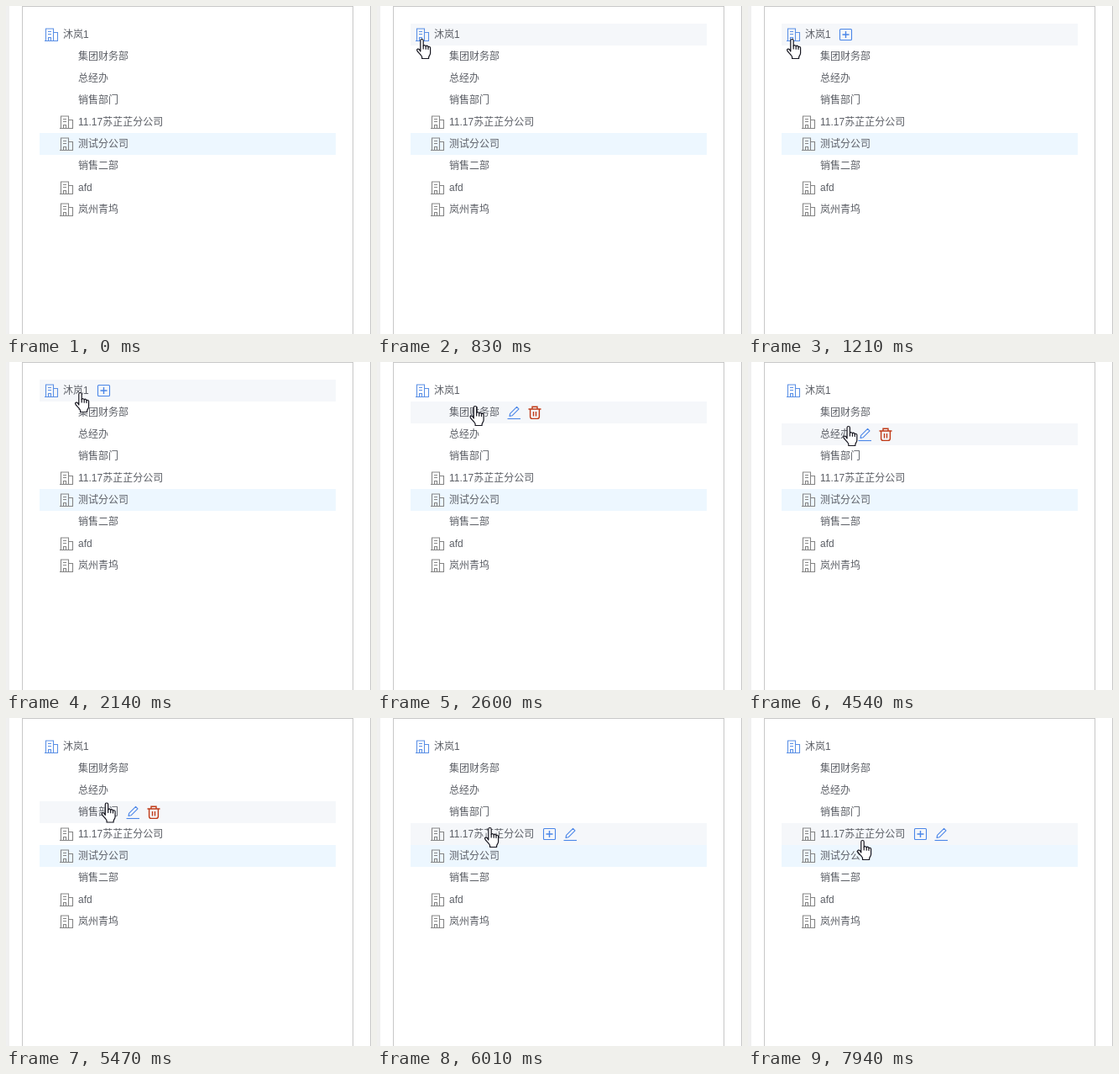
Write an HTML page that moves like this. It is 435 px wide and 390 px high and loops after 8000 ms.

```html
<!DOCTYPE html>
<html lang="zh">
<head>
<meta charset="utf-8">
<title>组织架构</title>
<style>
  html, body { margin: 0; width: 100%; height: 100%; overflow: hidden; background: #fff; }
  svg { display: block; }
  text { font: 12px "Liberation Sans", "Noto Sans CJK SC", "Noto Sans CJK", sans-serif; fill: #5c5f66; }
  .icon { fill: none; stroke-width: 1.1; }
</style>
</head>
<body>
<svg width="435" height="390" viewBox="0 0 435 390">
  <defs>
    <g id="building" class="icon" stroke-width="1">
      <path d="M1.5 15.5V1H10.5V15.5M0 15.5H16M10.5 5.5H15.5V15.5"/>
      <path d="M4 4.5H8M4 7.5H8M4.5 15V11.5H7.5V15"/>
    </g>
    <g id="plus" class="icon" stroke="#4a86e8">
      <rect x="1.5" y="1.5" width="14" height="13" rx="1"/>
      <path d="M4.5 8H12.5M8.5 4V12" stroke-width="1.4"/>
    </g>
    <g id="pencil" class="icon" stroke="#4a86e8">
      <path d="M.5 15.5H16"/>
      <path d="M3 12.4L3.6 9.4L11.6 1.4L14 3.8L6 11.8Z" stroke-linejoin="round"/>
    </g>
    <g id="trash" class="icon" stroke="#c03a17">
      <path d="M.5 4H15.5M5 4V1.2H11V4M2.6 4V13Q2.6 15.4 5 15.4H11Q13.4 15.4 13.4 13V4M6.5 7V12.5M9.5 7V12.5" stroke-width="1.4"/>
    </g>
  </defs>
  <g shape-rendering="crispEdges">
    <rect width="4" height="390" fill="#f0f0f0"/>
    <path d="M19.5 390V.5H413.5V390M434.5 0V390" fill="none" stroke="#c8c8c8"/>
  </g>
  <g id="tree"></g>
  <g id="hand" stroke="#15151f" stroke-width="1.2" stroke-linejoin="round" stroke-linecap="round">
    <path fill="#fff" d="M4.8 15V2.2a1.7 1.7 0 0 1 3.4 0V8.6a1.6 1.6 0 0 1 3 .4a1.5 1.5 0 0 1 2.8 .8a1.5 1.5 0 0 1 2.6 1.3V17c0 2.2-2 3.4-2 5.2V23.5H6.6V22C6.6 19.5 1.2 16 .6 13.6c-.2-1.6 1.8-2 2.8-1z"/>
    <path fill="none" d="M8.2 8.6V12M11.2 9V12.2M14 9.8V12.4"/>
  </g>
</svg>
<script>
const LOOP = 8000, STEP = 77, TOP = 21, ROW = 26, ACTIONS_FROM = 880;
const HOVER = "#f5f7fa", ACTIVE = "#edf7ff", SELECTED = "测试分公司";

const kinds = {
  root: { x: 68, color: "#5b90e6", actions: ["plus"] },
  branch: { x: 86, color: "#858585", actions: ["plus", "pencil"] },
  team: { x: 86, actions: ["pencil", "trash"] }
};

const items = [
  ["沐岚1", "root"],
  ["集团财务部", "team"],
  ["总经办", "team"],
  ["销售部门", "team"],
  ["11.17苏芷芷分公司", "branch"],
  [SELECTED, "branch"],
  ["销售二部", "team"],
  ["afd", "branch"],
  ["岚州青坞", "branch"]
];

// the pointer glides from stop to stop in even steps
const entry = { x: 346, y: 430 };
const stops = [
  { at: 440, steps: 6, x: 47, y: 39 },
  { at: 900, steps: 2, x: 36, y: 37 },
  { at: 1060, steps: 3, x: 46, y: 39 },
  { at: 1990, steps: 3, x: 82, y: 36 },
  { at: 2220, steps: 6, x: 110.5, y: 52 },
  { at: 3610, steps: 8, x: 114, y: 67 },
  { at: 4380, steps: 4, x: 113, y: 79 },
  { at: 5470, steps: 1, x: 113.5, y: 100.5 },
  { at: 5550, steps: 3, x: 127, y: 126 },
  { at: 5930, steps: 2, x: 128, y: 130 },
  { at: 7860, steps: 2, x: 130, y: 145 }
];

const hand = document.getElementById("hand");
const tree = document.getElementById("tree");

function add(parent, tag, attrs) {
  const el = document.createElementNS("http://www.w3.org/2000/svg", tag);
  for (const key in attrs) el.setAttribute(key, attrs[key]);
  return parent.appendChild(el);
}

function labelWidth(label) {
  return [...label].reduce((w, c) => w + (c > "~" ? 12 : c === "." ? 3.33 : 6.67), 0);
}

const rows = items.map(([label, kind], i) => {
  const { x, color, actions } = kinds[kind];
  const y = TOP + ROW * i;
  const back = add(tree, "rect", { x: 40, y, width: 353, height: ROW });
  if (color) add(tree, "use", { href: "#building", x: x - 22, y: y + 5, stroke: color });
  add(tree, "text", { x, y: y + 17 }).textContent = label;
  const tools = add(tree, "g", {});
  const left = Math.round(x + labelWidth(label) + 9);
  actions.forEach((name, k) => add(tools, "use", { href: "#" + name, x: left + 25 * k, y: y + 5 }));
  return { label, back, tools };
});

function pointerAt(t) {
  const i = stops.filter(s => t >= s.at).length - 1;
  if (i < 0) return null;
  const to = stops[i], from = stops[i - 1] || entry;
  const done = Math.floor((t - to.at) / STEP + 0.15) + 1;
  const p = Math.min(1, done / to.steps);
  return { x: from.x + (to.x - from.x) * p, y: from.y + (to.y - from.y) * p };
}

function draw(t) {
  const pointer = pointerAt(t);
  const hovered = pointer ? Math.floor((pointer.y - TOP) / ROW) : -1;
  rows.forEach(({ label, back, tools }, i) => {
    const over = i === hovered;
    back.setAttribute("fill", label === SELECTED ? ACTIVE : over ? HOVER : "#fff");
    tools.setAttribute("visibility", over && t >= ACTIONS_FROM ? "visible" : "hidden");
  });
  hand.setAttribute("visibility", pointer ? "visible" : "hidden");
  if (pointer) hand.setAttribute("transform", `translate(${pointer.x} ${pointer.y})`);
}

const begin = performance.now();
function tick() {
  draw((performance.now() - begin) % LOOP);
  requestAnimationFrame(tick);
}
tick();
</script>
</body>
</html>
```
